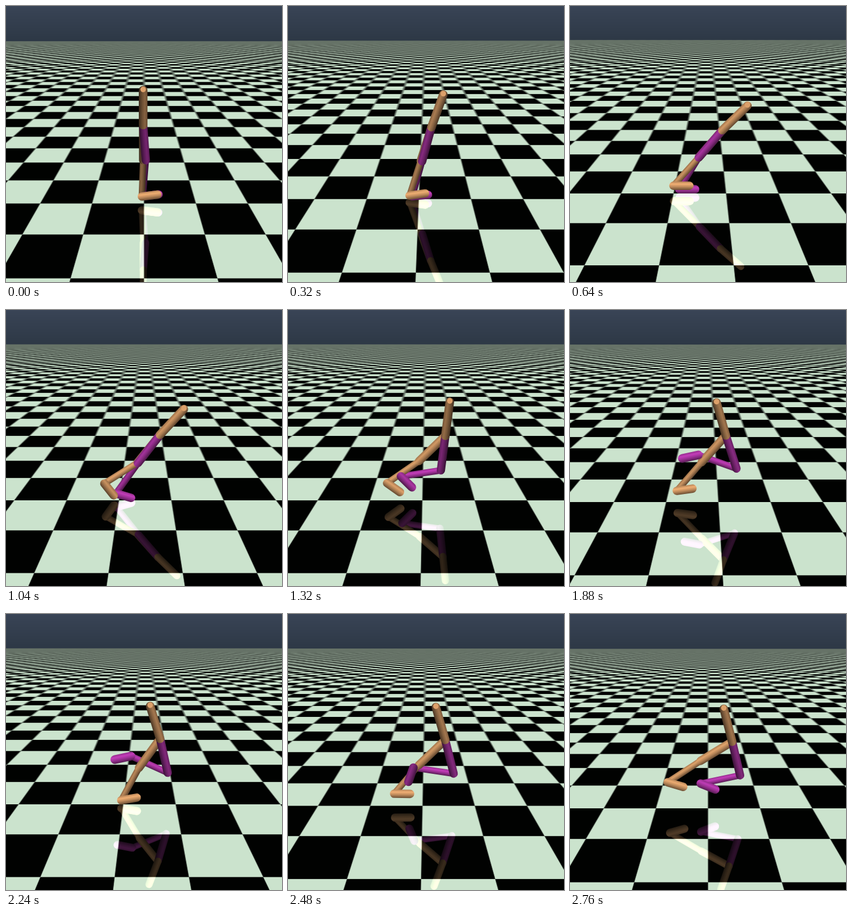
An HTML page with a canvas that plays this animation: 480x480 px, repeating every 2800 ms.

```html
<!DOCTYPE html>
<html lang="en">
<head>
<meta charset="utf-8">
<title>Walker</title>
<style>
html, body { margin: 0; width: 100%; height: 100%; overflow: hidden; background: #000; }
canvas { display: block; width: 480px; height: 480px; }
</style>
</head>
<body>
<canvas id="stage" width="480" height="480"></canvas>
<script>
const SIZE = 480, MID = 240, LOOP = 2800, STEP = 40;

// Camera: 45 degree field of view, pitched 20 degrees down, 4 units away.
const FOCAL = MID / Math.tan(Math.PI / 8);
const COS = Math.cos(Math.PI / 9), SIN = Math.sin(Math.PI / 9), DIST = 4;
const HORIZON = MID - FOCAL * SIN / COS;
const TILE = 2 / 3, FLOOR_END = 40;

const ctx = document.getElementById('stage').getContext('2d');
const mirror = document.createElement('canvas');
mirror.width = mirror.height = SIZE;
const mctx = mirror.getContext('2d');
const image = ctx.createImageData(SIZE, SIZE);

const ORANGE = [250, 182, 120], PURPLE = [204, 64, 194];
const DARK = [1, 2, 1], LIGHT = [203, 227, 205];

// Limbs in joint order; each hangs on the joint numbered `from` (0 is the hip).
const limb = (from, length, radius, color) => ({ from, length, radius, color });
const leg = (joint, color) => [
  limb(0, .45, .05, color), limb(joint, .5, .04, color), limb(joint + 1, .2, .053, color)
];
const LIMBS = [limb(0, .41, .05, ORANGE), ...leg(2, ORANGE), ...leg(5, PURPLE)];
const PAINT_ORDER = [5, 2, 1, 4, 0, 6, 3];

// A key pose: distance run, height looked at, hip offset from the view centre,
// then limb directions in degrees (legs: thigh, shin, foot).
const pose = (time, run, look, hip, torso, right, left) =>
  [time, run, look, ...hip, torso, ...right, ...left];
const KEYS = [
  pose(0, 0, .813, [-.01, .238], 90, [270, 268, 8], [274, 266, 8]),
  pose(640, .437, .668, [.17, .174], 46, [231, 230, 0], [231, 240, 0]),
  pose(1040, 1.652, .709, [.19, .167], 49, [233, 214, -56], [234, 236, -18]),
  pose(1600, 3.866, .709, [.259, .145], 118, [220, 223, -9], [294, 144, -90]),
  pose(1880, 5.201, .734, [.211, .159], 106, [230, 231, 9], [288, 159, -167]),
  pose(2240, 6.93, .709, [.19, .167], 107, [236, 243, 11], [283, 154, -167]),
  pose(2760, 9.333, .767, [.287, .131], 105, [213, 215, -18], [284, 193, -24])
];
const FIRST_ANGLE = 5;

function slope(i, n) {
  if (i === 0) return 0;
  const a = KEYS[i - 1], b = KEYS[Math.min(i + 1, KEYS.length - 1)];
  return (b[n] - a[n]) / (b[0] - a[0]);
}

// Smooth curve through the key poses.
function poseAt(t) {
  let i = 0;
  while (i < KEYS.length - 2 && t >= KEYS[i + 1][0]) i++;
  const a = KEYS[i], b = KEYS[i + 1], dt = b[0] - a[0];
  const s = (t - a[0]) / dt, s2 = s * s, s3 = s2 * s;
  const p = a.map((v, n) =>
    (2 * s3 - 3 * s2 + 1) * v + (s3 - 2 * s2 + s) * dt * slope(i, n) +
    (3 * s2 - 2 * s3) * b[n] + (s3 - s2) * dt * slope(i + 1, n));
  if (i > 0) {
    // legs swing against each other once running
    const swing = 6 * Math.sin(2 * Math.PI * s);
    for (const n of [1, 2]) {
      p[FIRST_ANGLE + n] -= swing;
      p[FIRST_ANGLE + n + 3] += swing;
    }
  }
  return p;
}

function jointsOf(p) {
  const pts = [[p[3], p[4]]];
  LIMBS.forEach(({ from, length }, i) => {
    const a = p[FIRST_ANGLE + i] * Math.PI / 180;
    pts.push([pts[from][0] + length * Math.cos(a), pts[from][1] + length * Math.sin(a)]);
  });
  return pts;
}

function project([x, z]) {
  const k = FOCAL / (DIST - z * SIN);
  return [MID + x * k, MID - z * COS * k, k];
}

// Square wave of period 2, averaged over a width.
function ramp(u) {
  const m = u - 2 * Math.floor(u / 2);
  return m < 1 ? m : 2 - m;
}
function wave(u, w) {
  return (ramp(u + w / 2) - ramp(u - w / 2)) / w;
}

function drawGround(run, look) {
  const height = DIST * SIN + look, near = DIST * COS;
  const reach = FOCAL * height / COS;
  const edge = HORIZON + reach / ((near + FLOOR_END) * COS + height * SIN);
  const data = image.data;
  for (let y = 0, p = 0; y < SIZE; y++) {
    const g = y / 60;
    const sky = [57 - 12 * g, 68 - 12 * g, 86 - 17 * g];
    const cover = Math.max(0, Math.min(1, y + 1 - edge));
    const drop = Math.max(y + .5, edge) - HORIZON;
    const depth = reach / drop;
    const back = (depth - height * SIN) / COS - near;
    const rowSpan = depth / drop / COS / TILE;
    const across = depth / FOCAL / TILE;
    const sy = wave(back / TILE, rowSpan);
    const blur = Math.max(across, rowSpan * 1.2);
    for (let x = 0; x < SIZE; x++, p += 4) {
      const v = cover ? .5 - .5 * sy * wave(run / TILE + (x + .5 - MID) * across, blur) : 0;
      for (let c = 0; c < 3; c++) {
        const floor = DARK[c] + (LIGHT[c] - DARK[c]) * v;
        data[p + c] = sky[c] + (floor - sky[c]) * cover;
      }
      data[p + 3] = 255;
    }
  }
  ctx.putImageData(image, 0, 0);
}

const shade = (rgb, k) => `rgb(${rgb.map(v => Math.min(255, Math.round(v * k))).join()})`;

function drawWalker(g, pts, flip) {
  const dots = pts.map(project);
  g.lineCap = 'round';
  for (const i of PAINT_ORDER) {
    const { from, radius, color } = LIMBS[i];
    const [x1, y1, k1] = dots[from], [x2, y2, k2] = dots[i + 1];
    const len = Math.hypot(x2 - x1, y2 - y1);
    const r = radius * (k1 + k2) / 2;
    // the side facing up is lit, level limbs most
    const side = (x2 > x1) === flip ? -r / len : r / len;
    const nx = (y2 - y1) * side, ny = (x1 - x2) * side;
    const lit = .48 + .38 * Math.abs(x2 - x1) / len;
    const cx = (x1 + x2) / 2, cy = (y1 + y2) / 2;
    const grad = g.createLinearGradient(cx + nx, cy + ny, cx - nx, cy - ny);
    grad.addColorStop(0, shade(color, lit * .85));
    grad.addColorStop(.3, shade(color, lit * 1.12));
    grad.addColorStop(.6, shade(color, lit * .9));
    grad.addColorStop(1, shade(color, lit * .5));
    g.strokeStyle = grad;
    g.lineWidth = 2 * r;
    g.beginPath();
    g.moveTo(x1, y1);
    g.lineTo(x2, y2);
    g.stroke();
  }
  if (!flip) {
    const [x, y] = dots[1];
    g.fillStyle = shade(ORANGE, .88);
    g.beginPath();
    g.arc(x, y - 1.5, 4.8, 0, 2 * Math.PI);
    g.fill();
  }
}

function draw(t) {
  const p = poseAt(t), look = p[2];
  const pts = jointsOf(p);
  drawGround(p[1], look);

  mctx.clearRect(0, 0, SIZE, SIZE);
  drawWalker(mctx, pts.map(([x, z]) => [x, -2 * look - z]), true);
  ctx.globalCompositeOperation = 'lighter';
  ctx.globalAlpha = .33;
  ctx.drawImage(mirror, 0, 0);
  ctx.globalCompositeOperation = 'source-over';
  ctx.globalAlpha = 1;

  drawWalker(ctx, pts, false);
}

let shown = -1;
function tick() {
  const frame = Math.floor(performance.now() % LOOP / STEP);
  if (frame !== shown) {
    shown = frame;
    draw(frame * STEP);
  }
  requestAnimationFrame(tick);
}
tick();
</script>
</body>
</html>
```
